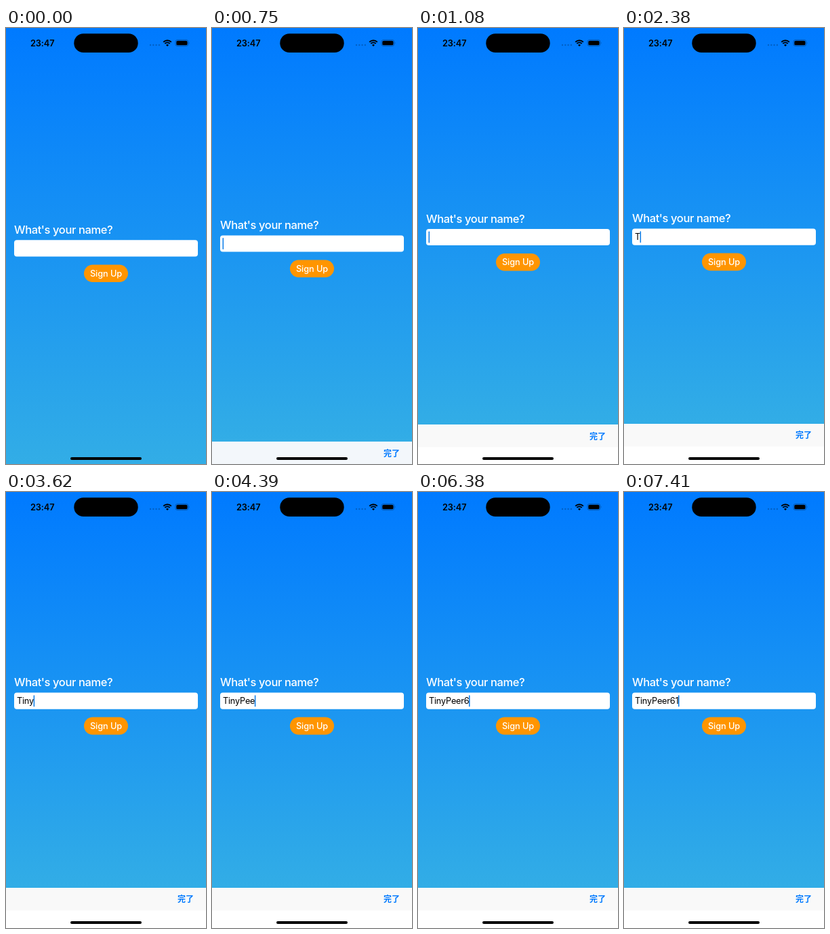
Recreate the animation shown at these times as an HTML page. Size 295x640 px, loop 8000 ms.

```html
<!DOCTYPE html>
<html lang="ja">
<head>
<meta charset="utf-8">
<title>Sign up</title>
<style>
  html, body { margin: 0; width: 100%; height: 100%; overflow: hidden; background: #fff; }
  svg { display: block; width: 100%; height: 100%; }
  text { font-family: Inter, "Liberation Sans", sans-serif; font-size: 12.75px; }
  .clock { font-weight: 600; letter-spacing: -.1px; }
  .title { font-size: 16.5px; font-weight: 500; letter-spacing: -.4px; fill: #fff; }
  .button { font-weight: 500; letter-spacing: -.1px; fill: #fff; text-anchor: middle; }
  .typed { letter-spacing: -.25px; font-kerning: none; }
  .done { font: 700 12px "Noto Sans CJK JP", "Noto Sans CJK", sans-serif; fill: #007aff; }
</style>
</head>
<body>
<svg viewBox="0 0 295 640">
  <defs>
    <linearGradient id="sky" x2="0" y2="1">
      <stop stop-color="#007aff"/>
      <stop offset="1" stop-color="#32ade6"/>
    </linearGradient>
  </defs>
  <rect id="back" width="295" height="640" fill="url(#sky)"/>

  <g id="form">
    <text class="title" x="12" y="302">What's your name?</text>
    <rect x="12" y="311.3" width="271" height="24.2" rx="4" fill="#fff"/>
    <text class="typed" id="typed" x="16" y="328.3"></text>
    <rect id="caret" y="315" width="1.5" height="17" rx=".75" fill="#087be8"/>
    <rect x="115" y="347.4" width="65" height="25.6" rx="12.8" fill="#ff9500"/>
    <text class="button" x="147.5" y="364.8">Sign Up</text>
  </g>

  <g id="panel">
    <rect width="295" height="60" fill="#fff"/>
    <rect id="bar" width="295" height="33.2"/>
    <text class="done" x="253" y="21.3">完了</text>
  </g>

  <text class="clock" x="36" y="26.7">23:47</text>
  <rect x="100.3" y="8.3" width="94.4" height="27.8" rx="13.9"/>
  <g fill-opacity=".22">
    <circle cx="213" cy="25" r="1.2"/><circle cx="217.3" cy="25" r="1.2"/>
    <circle cx="221.6" cy="25" r="1.2"/><circle cx="225.9" cy="25" r="1.2"/>
  </g>
  <g fill="none" stroke="#000" stroke-width="1.9">
    <path d="M232.2 20.7A8.2 8.2 0 0 1 243.8 20.7"/>
    <path d="M234.3 22.9A5.2 5.2 0 0 1 241.7 22.9"/>
  </g>
  <path d="M238 27L236 25A2.8 2.8 0 0 1 240 25Z"/>
  <rect x="250" y="17.4" width="18.8" height="9.2" rx="3" fill="none" stroke="#000" stroke-opacity=".35" stroke-width=".8"/>
  <rect x="251.3" y="18.7" width="16.2" height="6.6" rx="1.9"/>
  <path d="M269.8 20.5q1.3 1.5 0 3z" fill-opacity=".4"/>
  <rect x="95" y="630" width="105" height="4" rx="2"/>
</svg>
<script>
  const LOOP = 8000, FOCUS = 500;
  const NAME = "TinyPeer61";
  const KEY_TIMES = [2380, 2790, 3060, 3620, 4030, 4230, 4390, 4910, 6170, 6900];
  const SLIDE_TIMES = [650, 750, 860, 970, 1080, 1190, 1310];
  const BAR_RISE = 58.8, FORM_RISE = 16.8;

  const el = id => document.getElementById(id);
  const [back, form, typed, caret, panel, bar] =
    ["back", "form", "typed", "caret", "panel", "bar"].map(el);

  // Critically damped spring from 0 to 1.
  function spring(ms) {
    const x = Math.max(0, ms) * 0.0126;
    return 1 - (1 + x) * Math.exp(-x);
  }

  // The slide advances in held steps and ends settled.
  function slide(t, start) {
    const step = SLIDE_TIMES.filter(s => s <= t).pop();
    if (!step) return 0;
    return step === SLIDE_TIMES.at(-1) ? 1 : spring(step - start);
  }

  function draw(now) {
    const t = now % LOOP;
    const rise = slide(t, 603);
    const top = 640 - BAR_RISE * rise;
    const tint = 1 - rise;

    back.setAttribute("height", top);
    panel.setAttribute("transform", `translate(0 ${top})`);
    bar.setAttribute("fill", `rgb(${249 - 14 * tint}, ${249 - 4 * tint}, ${249 + 4 * tint})`);
    form.setAttribute("transform", `translate(0 ${-FORM_RISE * slide(t, 638)})`);

    const text = NAME.slice(0, KEY_TIMES.filter(k => k <= t).length);
    if (typed.textContent !== text) typed.textContent = text;
    const width = text ? typed.getComputedTextLength() : 0;
    caret.setAttribute("x", 15.6 + width);
    caret.setAttribute("visibility", t < FOCUS ? "hidden" : "visible");
  }

  function tick() {
    draw(performance.now());
    requestAnimationFrame(tick);
  }
  tick();
</script>
</body>
</html>
```
